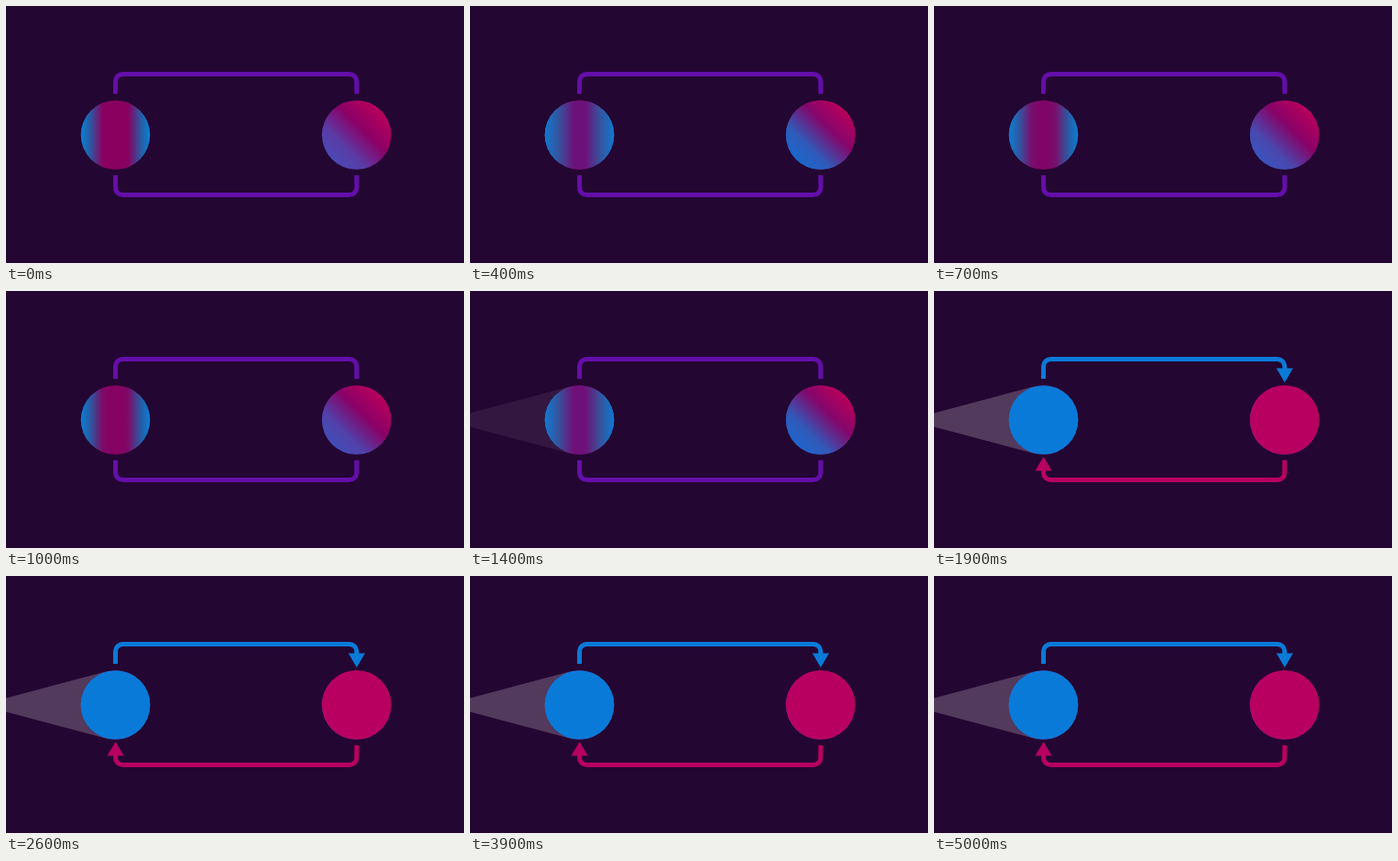
Recreate the animation shown at these times as an HTML page. Size 500x281 px, loop 5600 ms.

```html
<!DOCTYPE html>
<html lang="en">
<head>
<meta charset="utf-8">
<title>Linked pair</title>
<style>
  :root {
    --bg: #240632;
    --blue: #0a7ad8;
    --pink: #b80060;
    --violet: #640eaa;
  }
  html, body {
    margin: 0;
    width: 100%;
    height: 100%;
    overflow: hidden;
    background: var(--bg);
  }
  svg { display: block; width: 100vw; height: 100vh; }

  .line { fill: none; stroke-width: 5; }
  .blue { fill: var(--blue); }
  .pink { fill: var(--pink); }
  .line.blue { fill: none; stroke: var(--blue); }
  .line.pink { fill: none; stroke: var(--pink); }
  .line.violet { stroke: var(--violet); }

  .cool, .beam, .links, .fixed, .arrows, .glow { animation: 5600ms linear infinite; }
  .cool { animation-name: sway; animation-timing-function: cubic-bezier(.37, 0, .63, 1); }
  .beam { animation-name: shine; }
  .links { animation-name: unlink; animation-timing-function: step-end; }
  .fixed { animation-name: settle; animation-timing-function: step-end; }
  .arrows { animation-name: appear; animation-timing-function: step-end; }
  .glow { animation-name: flash; animation-timing-function: step-end; }
  .glow .line { stroke-width: 9; }
  .glow { filter: blur(2px); }

  /* The undecided colours swing back and forth every 880 ms */
  @keyframes sway {
    0%, 15.714%, 31.429%, 100% { opacity: 0; }
    7.857%, 23.571% { opacity: 1; }
  }
  @keyframes shine {
    0%, 23.214% { opacity: 0; }
    28.571%, 100% { opacity: 1; }
  }
  /* 1800 ms: measurement, 1900 ms: settled */
  @keyframes unlink {
    0% { opacity: 1; }
    32.143%, 100% { opacity: 0; }
  }
  @keyframes settle {
    0% { opacity: 0; }
    32.143% { opacity: .6; }
    33.929%, 100% { opacity: 1; }
  }
  @keyframes appear {
    0% { opacity: 0; }
    32.143%, 100% { opacity: 1; }
  }
  @keyframes flash {
    0% { opacity: 0; }
    32.143% { opacity: .6; }
    33.929%, 100% { opacity: 0; }
  }
</style>
</head>
<body>
<svg viewBox="0 0 500 281" preserveAspectRatio="none">
  <defs>
    <linearGradient id="bandWarm">
      <stop offset="0" stop-color="#0a80d6"/>
      <stop offset=".12" stop-color="#2460a8"/>
      <stop offset=".32" stop-color="#89005f"/>
      <stop offset=".68" stop-color="#89005f"/>
      <stop offset=".88" stop-color="#2460a8"/>
      <stop offset="1" stop-color="#0a80d6"/>
    </linearGradient>
    <linearGradient id="bandCool">
      <stop offset="0" stop-color="#1278d2"/>
      <stop offset=".2" stop-color="#35559f"/>
      <stop offset=".42" stop-color="#6d127b"/>
      <stop offset=".58" stop-color="#6d127b"/>
      <stop offset=".8" stop-color="#35559f"/>
      <stop offset="1" stop-color="#1278d2"/>
    </linearGradient>
    <linearGradient id="slantWarm" x1=".15" y1=".85" x2=".85" y2=".15">
      <stop offset="0" stop-color="#4a48b4"/>
      <stop offset=".25" stop-color="#5a3ca6"/>
      <stop offset=".62" stop-color="#8c0066"/>
      <stop offset="1" stop-color="#b8005c"/>
    </linearGradient>
    <linearGradient id="slantCool" x1=".15" y1=".85" x2=".85" y2=".15">
      <stop offset="0" stop-color="#1c68cc"/>
      <stop offset=".25" stop-color="#2e5cba"/>
      <stop offset=".65" stop-color="#84086c"/>
      <stop offset="1" stop-color="#b8005c"/>
    </linearGradient>
    <circle id="left" cx="119.5" cy="141" r="37.8"/>
    <circle id="right" cx="382.7" cy="141" r="37.8"/>
    <path id="over" d="M119.5 96V82.5a8 8 0 0 1 8-8H374.8a8 8 0 0 1 8 8V96"/>
    <path id="under" d="M382.8 185V198.5a8 8 0 0 1-8 8H127.5a8 8 0 0 1-8-8V185"/>
  </defs>

  <rect width="500" height="281" fill="#240632"/>
  <path class="beam" d="M-28 141L109.7 104.3V177.7Z" fill="#fff" fill-opacity=".21"/>

  <g class="links">
    <use href="#over" class="line violet"/>
    <use href="#under" class="line violet"/>
  </g>

  <g class="glow">
    <use href="#over" class="line blue"/>
    <use href="#under" class="line pink"/>
  </g>

  <g class="arrows">
    <use href="#over" class="line blue"/>
    <path class="blue" d="M373.8 84.5H392L382.9 100Z"/>
    <use href="#under" class="line pink"/>
    <path class="pink" d="M110.5 196.5H128.6L119.5 181.3Z"/>
  </g>

  <use href="#left" fill="url(#bandWarm)"/>
  <use href="#right" fill="url(#slantWarm)"/>
  <g class="cool">
    <use href="#left" fill="url(#bandCool)"/>
    <use href="#right" fill="url(#slantCool)"/>
  </g>
  <g class="fixed">
    <use href="#left" class="blue"/>
    <use href="#right" class="pink"/>
  </g>
</svg>
</body>
</html>
```
